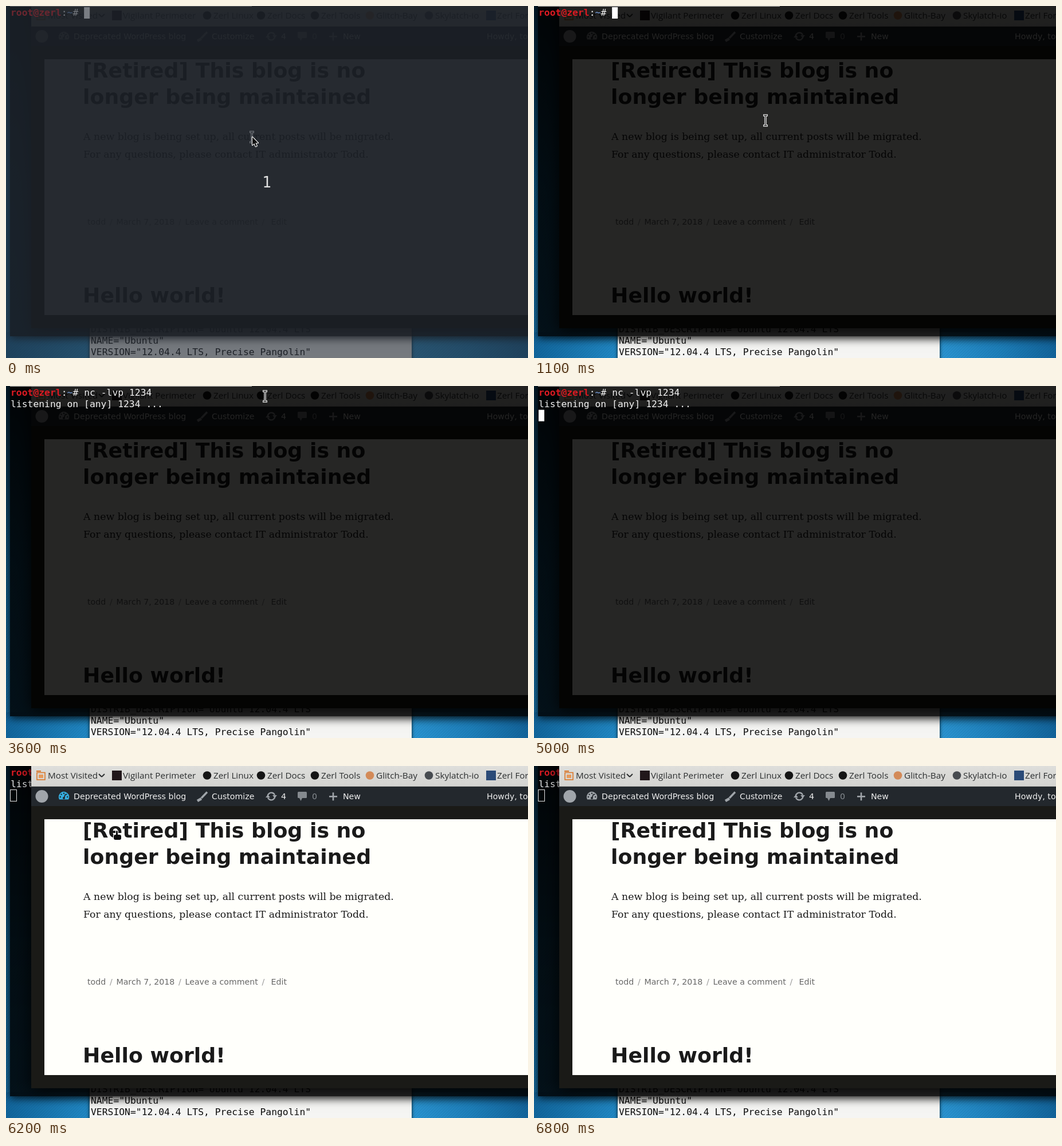
An HTML page with a canvas that plays this animation: 911 by 615 pixels, repeating every 8000 ms.

```html
<!DOCTYPE html>
<html lang="en">
<head>
<meta charset="utf-8">
<title>Desktop session</title>
<style>
html, body { margin: 0; width: 100%; height: 100%; overflow: hidden; background: #000; }
canvas { display: block; }
</style>
</head>
<body>
<canvas id="stage" width="911" height="615"></canvas>
<script>
const W = 911, H = 615, LOOP = 8000;
const c = document.getElementById('stage').getContext('2d');

const MONO = '"DejaVu Sans Mono", monospace';
const SANS = '"DejaVu Sans", sans-serif';
const SERIF = '"DejaVu Serif", serif';
const BAR = '15.3px "Open Sans", "Noto Sans", sans-serif';
const TERM = '16.38px ' + MONO;
const SMALL = '14.2px ' + SANS;
const CELL = 9.86, ROW = 19.8;

// Times of the main events
const COMMAND = 1800, ENTER = 2500, LISTEN = 2600, SWITCH = 5200, UNFOCUS = 5300;

function rect(x, y, w, h, fill) {
  c.fillStyle = fill;
  c.fillRect(x, y, w, h);
}

function disc(x, y, r, fill) {
  c.fillStyle = fill;
  c.beginPath();
  c.arc(x, y, r, 0, Math.PI * 2);
  c.fill();
}

function text(s, x, y, font, fill) {
  c.font = font;
  c.fillStyle = fill;
  c.fillText(s, x, y);
}

function gradient(x0, y0, x1, y1, ...colors) {
  const g = c.createLinearGradient(x0, y0, x1, y1);
  colors.forEach((k, i) => g.addColorStop(i / (colors.length - 1), k));
  return g;
}

function line(x0, y0, x1, y1, color, width) {
  c.beginPath();
  c.moveTo(x0, y0);
  c.lineTo(x1, y1);
  c.strokeStyle = color;
  c.lineWidth = width;
  c.stroke();
}

function triangle(x, y, w, h, fill) {
  c.beginPath();
  c.moveTo(x - w / 2, y);
  c.lineTo(x + w / 2, y);
  c.lineTo(x, y + h);
  c.fillStyle = fill;
  c.fill();
}

function round(x, y, w, h, r, fill) {
  c.beginPath();
  c.roundRect(x, y, w, h, r);
  c.fillStyle = fill;
  c.fill();
}

function shadowed(blur, dy, draw) {
  c.save();
  c.shadowColor = 'rgba(0,0,0,.85)';
  c.shadowBlur = blur;
  c.shadowOffsetY = dy;
  draw();
  c.restore();
}

// Desktop and the pale window at the bottom

function desktop() {
  rect(0, 0, W, H, gradient(0, 0, 0, H, '#061c2a', '#10567f', '#1976ae'));
  rect(0, 570, 146, 45, gradient(0, 0, 146, 0, '#11649a', '#2088c4'));
  rect(708, 570, 203, 45, gradient(708, 0, W, 0, '#2a94d0', '#1d7fba', '#12639a'));
  for (let x = -H; x < W; x += 5) line(x, H, x + H, 0, 'rgba(0,30,70,.1)', 1);
}

function paleWindow() {
  shadowed(6, 1, () => rect(146, 500, 562, 130, '#f5f5f3'));
  const lines = ['DISTRIB_DESCRIPTION="Ubuntu 12.04.4 LTS"', 'NAME="Ubuntu"',
    'VERSION="12.04.4 LTS, Precise Pangolin"'];
  lines.forEach((s, i) => text(s, 148, 570 + i * ROW, TERM, '#0c0c0c'));
}

// Browser

function bookmark(label, x, color, square) {
  if (square) rect(x - 19, 8, 17, 17, color);
  else disc(x - 11, 16.5, 7.3, color);
  text(label, x, 22, BAR, '#2c2f30');
}

function bookmarks() {
  rect(44, 0, W, 36, gradient(0, 0, 0, 36, '#dededb', '#d3d3d0'));
  rect(44, 35, W, 1, '#b5b5b2');
  c.strokeStyle = '#d9772b';
  c.lineWidth = 1.6;
  c.strokeRect(54, 11.5, 14, 12.5);
  rect(53, 8, 8, 2, '#d9772b');
  rect(57, 15, 8, 6, '#e79a5c');
  text('Most Visited', 73, 22, BAR, '#2c2f30');
  for (const side of [-1, 1]) line(167 + side * 5, 14, 167, 19, '#2c2f30', 2);

  bookmark('Vigilant Perimeter', 204, '#21171a', true);
  ['Linux', 'Docs', 'Tools'].forEach((s, i) => bookmark('Zerl ' + s, 362 + i * 94, '#151515'));
  bookmark('Glitch-Bay', 646, '#d38a58');
  bookmark('Skylatch-io', 749, '#474b50');
  bookmark('Zerl Forums', 857, '#2b4b78', true);
}

function gauge(color) {
  const hole = '#23282d';
  c.fillStyle = color;
  c.beginPath();
  c.arc(101, 54, 9.2, Math.PI * .84, Math.PI * 2.16);
  c.fill();
  for (let i = 0; i < 5; i++) {
    const a = Math.PI * (1 + i / 4);
    disc(101 + 6.2 * Math.cos(a), 54 + 6.2 * Math.sin(a), 1.2, hole);
  }
  line(101, 56, 104, 49, hole, 1.8);
  disc(101, 56, 2, hole);
}

function refreshIcon(x, y, color) {
  for (const turn of [0, Math.PI]) {
    c.save();
    c.translate(x, y);
    c.rotate(turn);
    c.beginPath();
    c.arc(0, 0, 6.4, 3.35, 5.9);
    c.strokeStyle = color;
    c.lineWidth = 2.4;
    c.stroke();
    triangle(6, -2, 8, 5, color);
    c.restore();
  }
}

function adminBar(hover) {
  const icon = '#a0a5aa', faint = '#858a8f', ink = '#eeeeee';
  rect(44, 36, W, 34, '#23282d');
  disc(62.5, 53, 11, icon);
  gauge(hover ? '#35aee0' : icon);
  text('Deprecated WordPress blog', 118, 58, SMALL, ink);

  line(351, 45.5, 341, 56, icon, 3.4);
  line(341, 57, 334, 61, icon, 4.6);
  text('Customize', 359, 58, SMALL, ink);

  refreshIcon(463, 53, icon);
  text('4', 480, 58, SMALL, ink);

  round(509, 45, 16, 11, 1.5, faint);
  triangle(514.5, 56, 5, 5, faint);
  text('0', 534, 58, SMALL, faint);

  rect(564, 52, 14, 2.6, icon);
  rect(569.7, 46.3, 2.6, 14, icon);
  text('New', 588, 58, SMALL, ink);
  text('Howdy, todd', 839, 58, SMALL, ink);
}

function page() {
  const head = 'bold 36.3px ' + SANS, body = '17.32px ' + SERIF, ink = '#1a1a1a';
  rect(67, 93, W, 447, '#fffffb');
  text('[Retired] This blog is no', 134, 125, head, ink);
  text('longer being maintained', 134, 171, head, ink);
  text('Hello world!', 134, 518, head, ink);
  text('A new blog is being set up, all current posts will be migrated.', 135, 234, body, ink);
  text('For any questions, please contact IT administrator Todd.', 135, 264.5, body, ink);

  let x = 142;
  for (const s of ['todd', '/', 'March 7, 2018', '/', 'Leave a comment', '/', ' Edit']) {
    text(s, x, 382, SMALL, s === '/' ? '#999999' : '#686868');
    x += c.measureText(s).width + 6.7;
  }
}

function browser(hover) {
  shadowed(26, 4, () => rect(44, -40, W + 60, 603, '#1a1a17'));
  bookmarks();
  adminBar(hover);
  page();
}

// Terminal

// The cursor blinks from the latest key press on
function cursorOn(t) {
  const last = t >= LISTEN ? LISTEN : t >= COMMAND ? COMMAND : 0;
  return Math.floor((t - last + 85) / 590) % 2 === 0;
}

function terminalCursor(t) {
  const col = t >= ENTER ? 0 : t >= COMMAND ? 25 : 13;
  const row = t >= LISTEN ? 2 : t >= ENTER ? 1 : 0;
  if (t >= UNFOCUS) {
    c.strokeStyle = '#e8e8e8';
    c.lineWidth = 1;
    c.strokeRect(7.5, 41.5, 11, 20);
  } else if (cursorOn(t) || row === 1) {
    rect(8 + col * CELL, 2 + row * ROW, 10, 20, '#ffffff');
  }
}

function terminal(t) {
  c.save();
  c.beginPath();
  c.rect(0, 577, W, 38);
  c.rect(0, 0, 7, H);
  c.clip();
  shadowed(14, 3, () => rect(7, -20, W + 20, 597, '#000'));
  c.restore();
  rect(7, 0, W, 577, 'rgba(0,0,0,.85)');

  const bold = 'bold ' + TERM, ink = '#f2f2f2';
  const put = (s, col, row, font, fill) => text(s, 8 + col * CELL, 17 + row * ROW, font, fill);
  put('root@zerl', 0, 0, bold, '#dc1a22');
  put(':', 9, 0, TERM, ink);
  put('~', 10, 0, bold, '#6688bb');
  put('#', 11, 0, TERM, ink);
  if (t >= COMMAND) put('nc -lvp 1234', 13, 0, TERM, ink);
  if (t >= LISTEN) put('listening on [any] 1234 ...', 0, 1, TERM, ink);
  terminalCursor(t);
}

// Pointer

function ibeam(x, y) {
  for (const [color, w] of [['#f4f4f4', 3.6], ['#111111', 1.2]]) {
    line(x, y - 9, x, y + 9, color, w);
    for (const end of [-9, 9]) line(x - 2.8 - w / 3, y + end, x + 2.8 + w / 3, y + end, color, w);
  }
}

function arrow(x, y) {
  const p = new Path2D('M1 1v14l3.2-3 2.4 5.4 2.2-1-2.3-5.2H11z');
  c.save();
  c.translate(x, y);
  c.lineJoin = 'round';
  c.lineWidth = 2.2;
  c.strokeStyle = '#ffffff';
  c.stroke(p);
  c.fillStyle = '#111111';
  c.fill(p);
  c.restore();
}

function hand(x, y) {
  for (const [color, pad] of [['#ffffff', 1], ['#0c0c0c', 0]]) {
    round(x - pad, y - pad, 3 + 2 * pad, 12 + 2 * pad, 1.5, color);
    round(x - 4 - pad, y + 7 - pad, 13 + 2 * pad, 9 + 2 * pad, 3, color);
  }
}

const progress = (t, from, to) => Math.min(1, Math.max(0, (t - from) / (to - from)));
const smooth = p => p * p * (3 - 2 * p);
const glide = (a, b, p) => a.map((v, i) => v + (b[i] - v) * smooth(p));
const bend = (a, k, b, p) =>
  a.map((v, i) => (1 - p) ** 2 * v + 2 * p * (1 - p) * k[i] + p * p * b[i]);

const REST = [429, 229], MIDDLE = [404, 200], LOW = [483, 266], TITLE = [192, 113];

function pointer(t) {
  if (t < 1100) ibeam(...glide(REST, MIDDLE, progress(t, 500, 800)));
  else if (t < COMMAND) ibeam(...glide(MIDDLE, LOW, progress(t, 1100, 1500)));
  else if (t >= 2800 && t < 3700) ibeam(...glide([486, 266], [452, 18], progress(t, 3100, 3600)));
  else if (t === 6200) hand(...TITLE);
  else if (t >= 5800 && t < 6200) arrow(...bend([622, 12], [500, 245], TITLE, progress(t, 5800, 6200)));
  else if (t > 6200 && t < 6800) arrow(...bend(TITLE, [600, 20], [184, 8], progress(t, 6200, 6700)));
}

function countdown() {
  rect(0, 0, W, H, 'rgba(39,46,55,.62)');
  c.textAlign = 'center';
  text('1', 455, 317, '26px ' + MONO, '#e2e2e2');
  c.textAlign = 'left';
  arrow(429, 228);
}

function draw(t) {
  desktop();
  paleWindow();
  if (t < SWITCH) {
    browser(false);
    terminal(t);
    rect(7, 0, 422, 1, '#b8b8b6');
  } else {
    terminal(t);
    browser(t === 6200);
  }
  pointer(t);
  if (t < 100) countdown();
}

const start = performance.now();
function tick() {
  const t = Math.max(0, performance.now() - start) % LOOP;
  draw(Math.floor(t / 100) * 100);
  requestAnimationFrame(tick);
}
tick();
</script>
</body>
</html>
```
